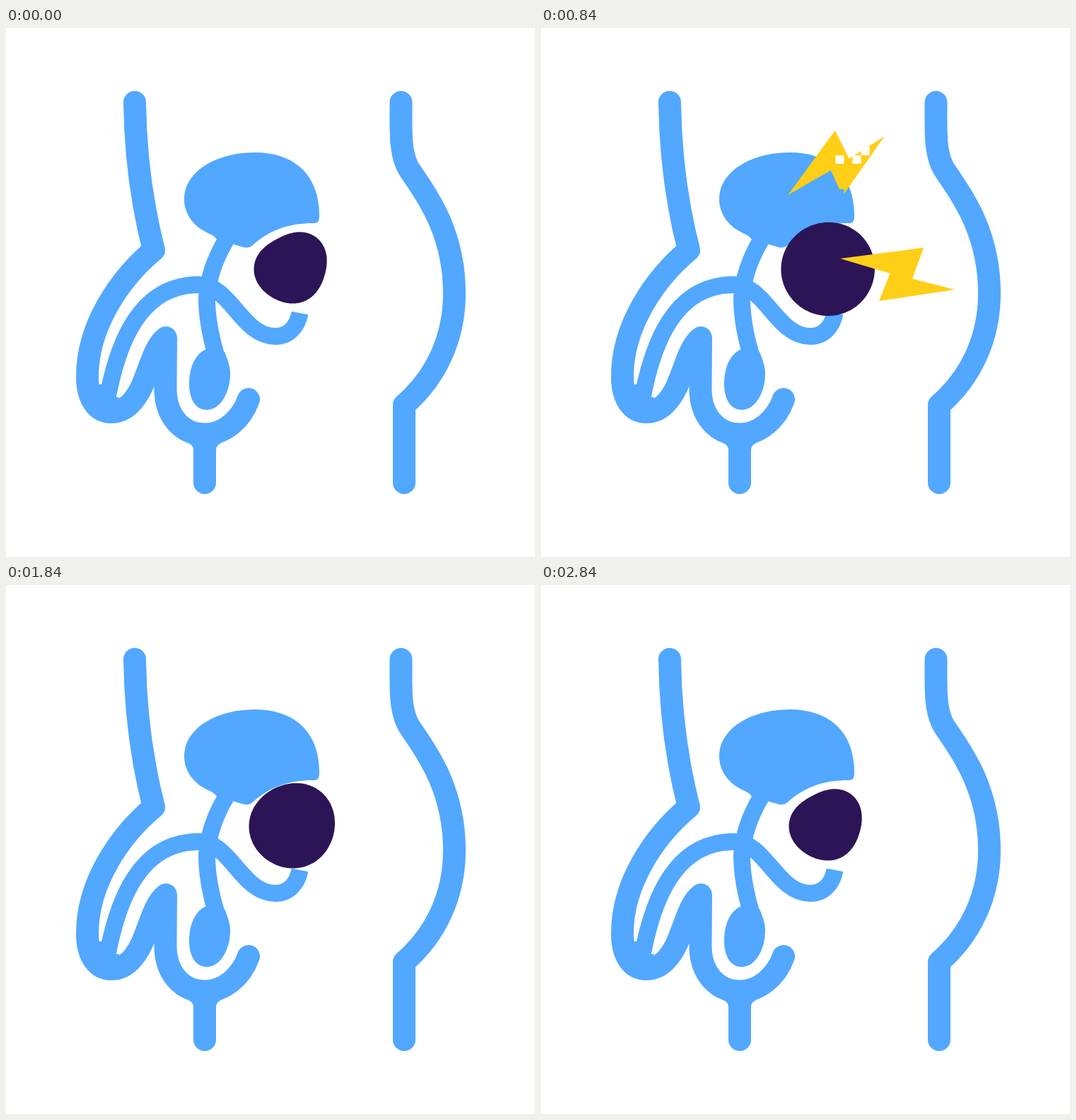
Write an HTML page that moves like this. It is 748x748 px and loops after 2.88 s.

```html
<!DOCTYPE html>
<html lang="en">
<head>
<meta charset="utf-8">
<title>Anatomy icon</title>
<style>
html, body { margin: 0; width: 100%; height: 100%; overflow: hidden; background: #fff; }
svg { display: block; width: 100vw; height: 100vh; }
.line { fill: none; stroke: #52a7ff; stroke-width: 32; stroke-linecap: round; stroke-linejoin: round; }
.duct { fill: none; stroke: #52a7ff; stroke-width: 24; }
.solid { fill: #52a7ff; }
#gland { fill: #2b1557; }
#bolt { fill: #ffce17; }
</style>
</head>
<body>
<svg viewBox="0 0 748 748">
  <defs>
    <polygon id="bolt" points="-81,-22 37,-37.5 21,6.5 81,22 -26,38 -10.5,-1"/>
    <clipPath id="clip0"><path/></clipPath>
    <clipPath id="clip1"><path/></clipPath>
  </defs>
  <g class="line">
    <path d="M182 105C183 180 192 248 209 314C161 354 115 421 115 493C115 525 129 543 149 543C170 543 184 524 192 507C204 480 210 450 226 438L225.5 510C225.5 548 248 574.5 281 574.5C309 574.5 333 553 343 525"/>
    <path d="M281 575V643"/>
    <path d="M558.5 105C558.5 145 557 172 567 194C574 212 634 270 634 375C634 440 607 495 563 533V643"/>
  </g>
  <g class="duct">
    <path d="M144 520C158 448 188 363 272 363C318 363 333 436 381 436C400 436 412 422 415.5 403"/>
    <path d="M311 300C298 322 286 350 284 382C284 410 289 435 297 462"/>
  </g>
  <g class="solid">
    <path d="M352 176C405 176 443 205 443 265C443 274 441 276 434 276C403 276 375 284 350 306Q344 312 336 310L322 306L298 299C294 292 285 291 275 284C262 275 252 260 252 242C252 203 297 176 352 176Z"/>
    <path d="M281 455C266 463 259 482 259 503C259 525 268 540 284 540C303 540 317 515 317 489C317 478 313 468 309 458Z"/>
    <path d="M258 587Q265 590 265 597H297Q297 590 304 587Z"/>
    <path d="M128 504H136L154 522H160L150 545H120Z"/>
  </g>
  <path id="gland"/>
  <g clip-path="url(#clip0)"><use href="#bolt"/></g>
  <g clip-path="url(#clip1)"><use href="#bolt"/></g>
</svg>
<script>
const LOOP = 2880, STEP = 40, SWELL_PEAK = 1010, CELL = 12, REACH = 108;

const bolts = [
  {
    enter: 450, leave: 1085, x: 505, y: 348,
    pose: t => ({ dx: -0.00027 * (t - 900) ** 2, dy: 0.00083 * (t - 850) ** 2, turn: 0, scale: 1 })
  },
  {
    enter: 720, leave: 1335, x: 416.5, y: 180,
    pose: t => {
      const u = (t - 1110) / 290, q = u * u;
      return { dx: q, dy: 17 * q, turn: -53.3 - 8 * u * Math.abs(u), scale: 1 - 0.06 * q };
    }
  }
];

const clamp = v => Math.min(1, Math.max(0, v));
const smooth = s => s * s * (3 - 2 * s);
const fade = (t, start) => clamp((t - start) / 130);
const noise = (x, y) => {
  const n = Math.sin(x * 12.9898 + y * 78.233) * 43758.5453;
  return n - Math.floor(n);
};

const gland = document.getElementById('gland');
const shapes = document.querySelectorAll('use');
const masks = document.querySelectorAll('clipPath path');

// A circle whose two- and three-lobed ripples flatten out as it swells
function glandPath(swell) {
  const points = [];
  for (let deg = 0; deg < 360; deg += 3) {
    const a = deg * Math.PI / 180;
    const ripple = 2.66 * Math.cos(2 * a + 1.31) + 2.37 * Math.cos(3 * a + 2.83);
    const r = 50.5 + 17 * swell + ripple * (1 - swell);
    const x = 404 + 2 * swell + r * Math.cos(a);
    const y = 339 + 2 * swell + r * Math.sin(a);
    points.push(`${x.toFixed(2)} ${y.toFixed(2)}`);
  }
  return `M${points.join('L')}Z`;
}

// Square cells around the bolt, each shown once the cover passes its random value
function maskPath(bolt, cover) {
  if (cover <= 0) return '';
  if (cover >= 1) return 'M0 0H748V748H0Z';
  let d = '';
  for (let y = bolt.y - REACH; y < bolt.y + REACH; y += CELL) {
    for (let x = bolt.x - REACH; x < bolt.x + REACH; x += CELL) {
      if (noise(x, y) < cover) d += `M${x} ${y}h${CELL}v${CELL}h${-CELL}z`;
    }
  }
  return d;
}

function draw(t) {
  const swell = t < SWELL_PEAK ? t / SWELL_PEAK : (LOOP - t) / (LOOP - SWELL_PEAK);
  gland.setAttribute('d', glandPath(smooth(swell)));
  bolts.forEach((bolt, i) => {
    const { dx, dy, turn, scale } = bolt.pose(t);
    shapes[i].setAttribute('transform',
      `translate(${bolt.x + dx} ${bolt.y + dy}) rotate(${turn}) scale(${scale})`);
    masks[i].setAttribute('d', maskPath(bolt, fade(t, bolt.enter) - fade(t, bolt.leave)));
  });
}

function tick() {
  draw(Math.floor(performance.now() % LOOP / STEP) * STEP);
  requestAnimationFrame(tick);
}
tick();
</script>
</body>
</html>
```
